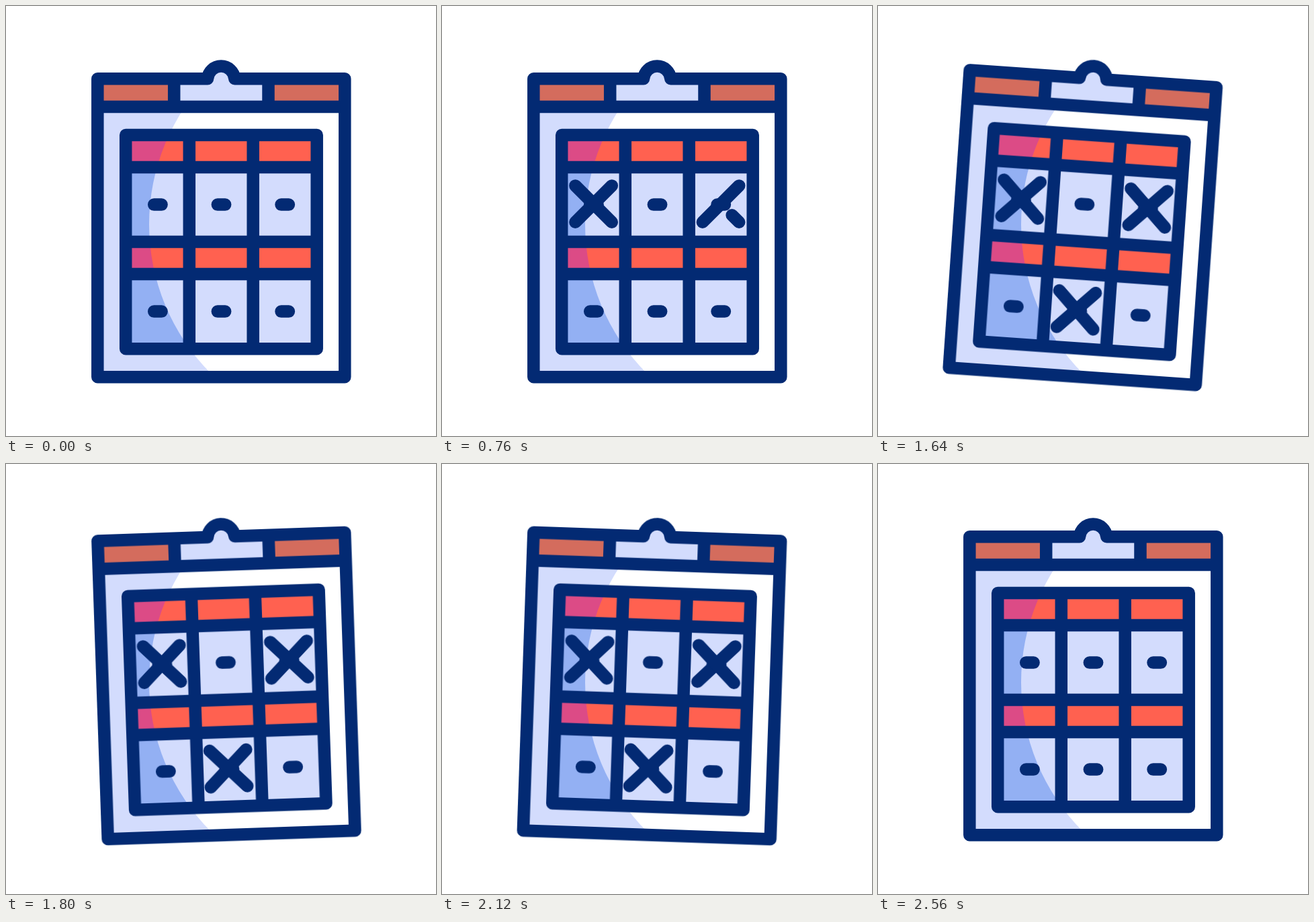
Write an HTML page without scripts that moves like this. It is 640 px wide and 640 px high and loops after 3000 ms.

```html
<!DOCTYPE html>
<html lang="en">
<head>
<meta charset="utf-8">
<title>Clipboard schedule</title>
<style>
  html, body { margin: 0; width: 100%; height: 100%; overflow: hidden; background: #fff; }
  svg { display: block; width: 100%; height: 100%; }

  .shade { --paper: #d3dcfd; --cell: #93b0f3; --band: #dc4b86; }
  .lit { --paper: #fff; --cell: #d3dcfd; --band: #ff6150; }
  .paper { fill: var(--paper); }
  .cell { fill: var(--cell); }
  .band { fill: var(--band); }
  .strip { fill: #d46c5d; }
  .clip { fill: #d3dcfd; }
  .ink { fill: none; stroke: #032a73; stroke-width: 18.5; stroke-linecap: round; stroke-linejoin: round; }

  .swing { transform-origin: 320.3px 107px; animation: swing 3s cubic-bezier(.333, 0, .667, 1) infinite; }
  @keyframes swing {
    0%, 46.667% { transform: rotate(0deg); }
    54.667% { transform: rotate(4deg); }
    62.667% { transform: rotate(-4deg); }
    70.667% { transform: rotate(2deg); }
    80%, 100% { transform: rotate(0deg); }
  }

  /* Offset 1.01 is undrawn, 0 is complete, -1.01 is wiped from its start. */
  .stroke { stroke-dasharray: 1 2; stroke-dashoffset: 1.01; animation: 3s cubic-bezier(.333, 0, .667, 1) infinite; }
  .first .down { animation-name: first-down; }
  .first .up { animation-name: first-up; }
  .second .down { animation-name: second-down; }
  .second .up { animation-name: second-up; }
  .third .down { animation-name: third-down; }
  .third .up { animation-name: third-up; }
  @keyframes first-down {
    0% { stroke-dashoffset: 1.01; }
    9.333%, 70.667% { stroke-dashoffset: 0; }
    80%, 100% { stroke-dashoffset: -1.01; }
  }
  @keyframes first-up {
    0%, 6.667% { stroke-dashoffset: 1.01; }
    16%, 76% { stroke-dashoffset: 0; }
    85.333%, 100% { stroke-dashoffset: -1.01; }
  }
  @keyframes second-down {
    0%, 16% { stroke-dashoffset: 1.01; }
    25.333%, 70.667% { stroke-dashoffset: 0; }
    80%, 100% { stroke-dashoffset: -1.01; }
  }
  @keyframes second-up {
    0%, 22.667% { stroke-dashoffset: 1.01; }
    32%, 76% { stroke-dashoffset: 0; }
    85.333%, 100% { stroke-dashoffset: -1.01; }
  }
  @keyframes third-down {
    0%, 32% { stroke-dashoffset: 1.01; }
    41.333%, 70.667% { stroke-dashoffset: 0; }
    80%, 100% { stroke-dashoffset: -1.01; }
  }
  @keyframes third-up {
    0%, 38.667% { stroke-dashoffset: 1.01; }
    48%, 76% { stroke-dashoffset: 0; }
    85.333%, 100% { stroke-dashoffset: -1.01; }
  }
</style>
</head>
<body>
<svg viewBox="0 0 640 640">
  <defs>
    <clipPath id="light"><circle cx="526.5" cy="325" r="313.5"/></clipPath>
    <g id="board">
      <path class="paper" d="M136.3 150H504.3V552.2H136.3Z"/>
      <path class="cell" d="M178.2 192H462.7V510.2H178.2Z"/>
      <path class="band" d="M178.2 192H462.7V240H178.2ZM178.2 351H462.7V399H178.2Z"/>
    </g>
  </defs>

  <g class="swing shade"><use href="#board"/></g>
  <!-- The light stays still while the board swings beneath it. -->
  <g clip-path="url(#light)">
    <g class="swing lit"><use href="#board"/></g>
  </g>

  <g class="swing">
    <path class="strip" d="M136.3 108.3H250V150H136.3ZM390.5 108.3H504.3V150H390.5Z"/>
    <path class="clip" d="M250 108.3H300A20.2 20.2 0 0 1 340.3 108.3H390.5V150H250Z"/>
    <g class="ink">
      <path d="M300 108.3H136.3V552.2H504.3V108.3H340.3A20.2 20.2 0 0 0 300 108.3M136.3 150H504.3M250.2 108.3V150M390.5 108.3V150"/>
      <path d="M178.2 192H462.7V510.2H178.2ZM272.8 192V510.2M367.7 192V510.2M178.2 240H462.7M178.2 351H462.7M178.2 399H462.7"/>
      <path d="M220.2 295.6h11.4M314.8 295.6h11.4M409.5 295.6h11.4M220.2 454.6h11.4M314.8 454.6h11.4M409.5 454.6h11.4"/>
      <g class="first" transform="translate(225.6 294.6)">
        <path class="stroke down" pathLength="1" d="M27.2-27.2L-27.2 27.2"/>
        <path class="stroke up" pathLength="1" d="M27.2 27.2L-27.2-27.2"/>
      </g>
      <g class="second" transform="translate(415 294.6)">
        <path class="stroke down" pathLength="1" d="M27.2-27.2L-27.2 27.2"/>
        <path class="stroke up" pathLength="1" d="M27.2 27.2L-27.2-27.2"/>
      </g>
      <g class="third" transform="translate(319.2 453.2)">
        <path class="stroke down" pathLength="1" d="M27.2-27.2L-27.2 27.2"/>
        <path class="stroke up" pathLength="1" d="M27.2 27.2L-27.2-27.2"/>
      </g>
    </g>
  </g>
</svg>
</body>
</html>
```
